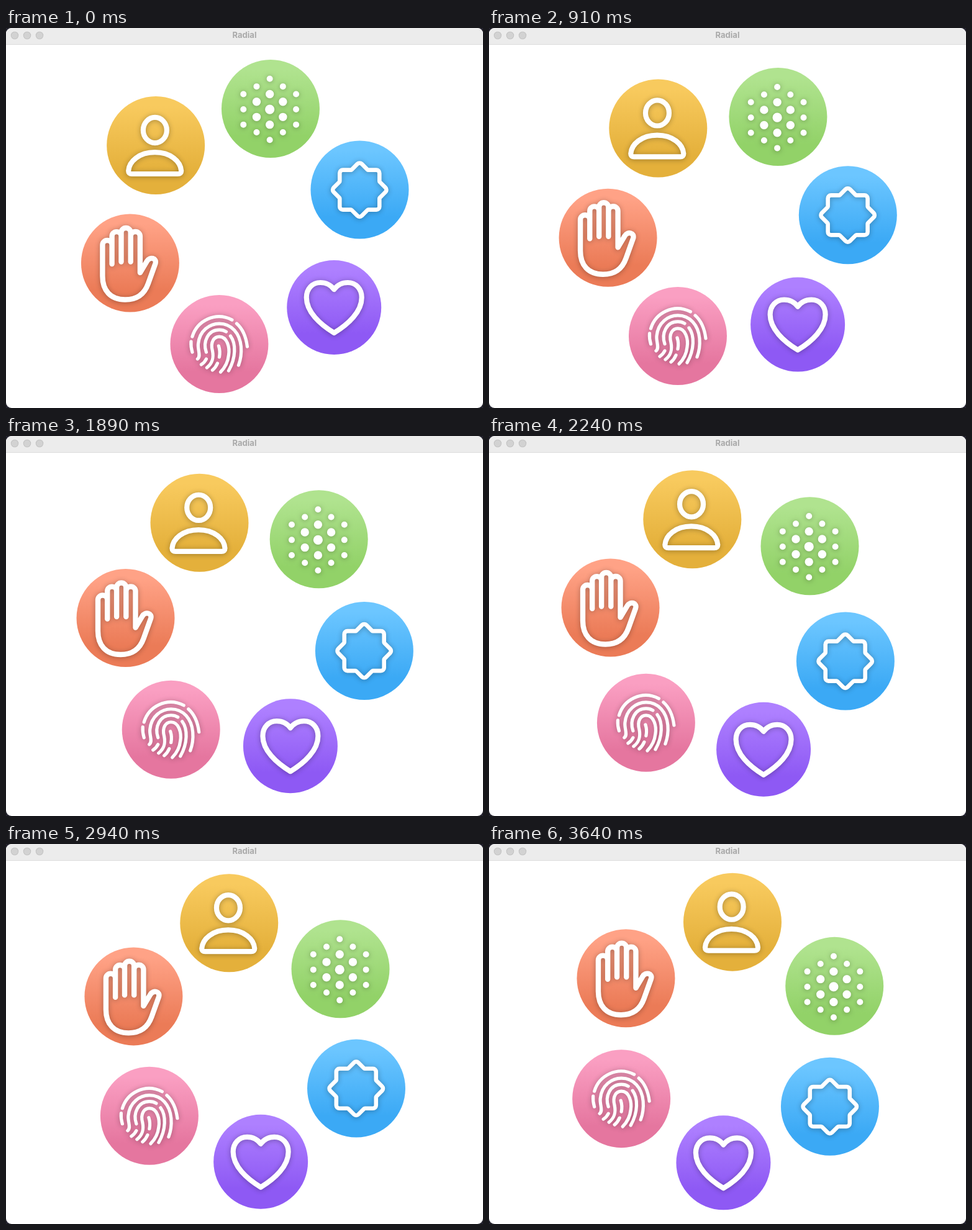
An HTML page with a canvas that plays this animation: 768x612 px, repeating every 3.71 s.

```html
<!DOCTYPE html>
<html lang="en">
<head>
<meta charset="utf-8">
<title>Radial</title>
<style>
  html, body { margin: 0; width: 100%; height: 100%; overflow: hidden; background: #24232e; }
  canvas { display: block; }
</style>
</head>
<body>
<canvas id="stage" width="768" height="612"></canvas>
<script>
const ctx = document.getElementById('stage').getContext('2d');
const LOOP = 3710, STEP = 70;
const CX = 384.7, CY = 319.5, ORBIT = 194;
const TAU = Math.PI * 2, DEG = Math.PI / 180;

// time in ms, ring angle in degrees
const TURN = [
  [0, -17.72], [490, -11.07], [1330, 0.24], [1890, 7.83],
  [2520, 16.77], [3290, 27.2], [3640, 32.15]
];

function dotsPath() {
  const path = new Path2D(), radii = [7.6, 6.7, 5];
  for (let q = -2; q <= 2; q++) {
    for (let r = -2; r <= 2; r++) {
      const ring = Math.max(Math.abs(q), Math.abs(r), Math.abs(q + r));
      if (ring > 2) continue;
      const x = -1.3 + q * 21.2, y = 1.1 + (r + q / 2) * 24.6;
      path.moveTo(x + radii[ring], y);
      path.arc(x, y, radii[ring], 0, TAU);
    }
  }
  return path;
}

// outline of two overlapping squares, with rounded corners
function sealPath() {
  const path = new Path2D(), half = 32;
  const corner = i => {
    const a = i * TAU / 16;
    const r = i % 2 ? half / Math.cos(TAU / 16) : half * Math.SQRT2;
    return [-0.2 + r * Math.cos(a), 0.2 + r * Math.sin(a)];
  };
  const a = corner(0), b = corner(1);
  path.moveTo((a[0] + b[0]) / 2, (a[1] + b[1]) / 2);
  for (let i = 1; i <= 16; i++) {
    path.arcTo(...corner(i), ...corner(i + 1), i % 2 ? 2 : 5);
  }
  path.closePath();
  return path;
}

const person = new Path2D(`
  M-20.3 -24.5 A19 20.6 0 1 1 17.7 -24.5 A19 20.6 0 1 1 -20.3 -24.5 Z
  M-38.5 46 H35.5 Q41 46 41 41 C40 26 24 11.2 -1.5 11.2
  C-27 11.2 -43 26 -44 41 Q-44 46 -38.5 46 Z`);

const heart = new Path2D(`
  M0 -29 C-6 -37 -14 -40 -22 -40 C-35 -40 -44.5 -30 -44.5 -16
  C-44.5 7 -23 27 0 41 C23 27 44.5 7 44.5 -16
  C44.5 -30 35 -40 22 -40 C14 -40 6 -37 0 -29 Z`);

const hand = new Path2D(`
  M-29.3 1.5 V-43 A7.45 7.45 0 0 1 -14.4 -43 V-2
  M-14.4 -43 V-49 A7.6 7.6 0 0 1 .8 -49 V-2
  M.8 -43 A7.6 7.6 0 0 1 16 -43 V15.5 L27 -3
  C31.5 -11 43.5 -8 40.5 1 L29 33 C23 50 11 59 -8 59
  C-32 59 -44.5 44 -44.5 21 V-29 A7.6 7.6 0 0 1 -29.3 -29`);

const fingerprint = new Path2D(`
  M-43.5 -12 C-36 -37 -7 -53 20.5 -39
  M28 -33 C37 -25 43 -12 45 4
  M-45.5 -4 C-46 2 -45 8 -43.5 13
  M-35 24 C-29 19 -35 10 -34 0 C-32 -22 -15 -33 0 -33
  C20 -33 33 -17 35 4 C36 16 34 26 31 34
  M-21 13 C-27 -4 -18 -23 0 -23 C5 -23 8 -22 11 -20
  M-29 33 Q-24 30 -21 24
  M18 -13 C27 -1 27 22 15 43
  M-20 38 C-10 30 -9 21 -11 11 C-15 -4 -8 -12 0 -12
  C13 -12 17 6 15 18 C14 28 9 38 2 45
  M-1 3 C1 9 1 16 0 21
  M-11 42 Q-6 38 -3 31`);

// in ring order, 60 degrees apart; width 0 means a filled icon
const badges = [
  { r: 79, top: '#6cc6ff', low: '#3ba9f5', icon: sealPath(), width: 6.6 },
  { r: 76, top: '#ae80ff', low: '#8e59f4', icon: heart, width: 8.2 },
  { r: 79, top: '#fa9fc2', low: '#e5769f', icon: fingerprint, width: 5.2 },
  { r: 79, top: '#ffa286', low: '#eb7b57', icon: hand, width: 8.4 },
  { r: 79, top: '#f8ca5e', low: '#e4b03b', icon: person, width: 8.2 },
  { r: 79, top: '#b0e38f', low: '#92d268', icon: dotsPath(), width: 0 }
];

function disc(x, y, r, fill) {
  ctx.fillStyle = fill;
  ctx.beginPath();
  ctx.arc(x, y, r, 0, TAU);
  ctx.fill();
}

function angleAt(t) {
  let i = 1;
  while (i < TURN.length - 1 && t > TURN[i][0]) i++;
  const [t0, a0] = TURN[i - 1], [t1, a1] = TURN[i];
  return a0 + (a1 - a0) * (t - t0) / (t1 - t0);
}

function drawWindow() {
  ctx.fillStyle = '#24232e';
  ctx.fillRect(0, 0, 768, 612);
  ctx.beginPath();
  ctx.roundRect(0, 0, 768, 612, 9);
  ctx.clip();
  ctx.fillStyle = '#fff';
  ctx.fillRect(0, 0, 768, 612);
  ctx.fillStyle = '#ececec';
  ctx.fillRect(0, 0, 768, 26);
  ctx.fillStyle = '#dcdcdc';
  ctx.fillRect(0, 26, 768, 1);
  for (const x of [14, 34, 54]) {
    disc(x, 12, 6.2, '#bfbfbf');
    disc(x, 12, 5.4, '#d2d2d2');
  }
  ctx.fillStyle = '#a9a9a9';
  ctx.font = '700 13px Inter, sans-serif';
  ctx.textAlign = 'center';
  ctx.fillText('Radial', 384, 16);
}

function drawBadge({ r, top, low, icon, width }, angle) {
  ctx.save();
  ctx.translate(CX + ORBIT * Math.cos(angle), CY + ORBIT * Math.sin(angle));
  const shade = ctx.createLinearGradient(0, -r, 0, r);
  shade.addColorStop(0.1, top);
  shade.addColorStop(0.78, low);
  disc(0, 0, r, shade);
  ctx.shadowColor = 'rgba(0,0,0,0.3)';
  ctx.shadowBlur = 8;
  ctx.shadowOffsetY = 1;
  ctx.fillStyle = ctx.strokeStyle = '#fff';
  ctx.lineWidth = width || 1;
  ctx.lineCap = ctx.lineJoin = 'round';
  if (width) ctx.stroke(icon);
  else ctx.fill(icon);
  ctx.restore();
}

function draw(t) {
  const turn = angleAt(Math.floor(t / STEP) * STEP);
  ctx.save();
  drawWindow();
  badges.forEach((badge, i) => drawBadge(badge, (turn + i * 60) * DEG));
  ctx.restore();
}

const start = performance.now();
function tick() {
  draw((performance.now() - start) % LOOP);
  requestAnimationFrame(tick);
}
tick();
</script>
</body>
</html>
```
